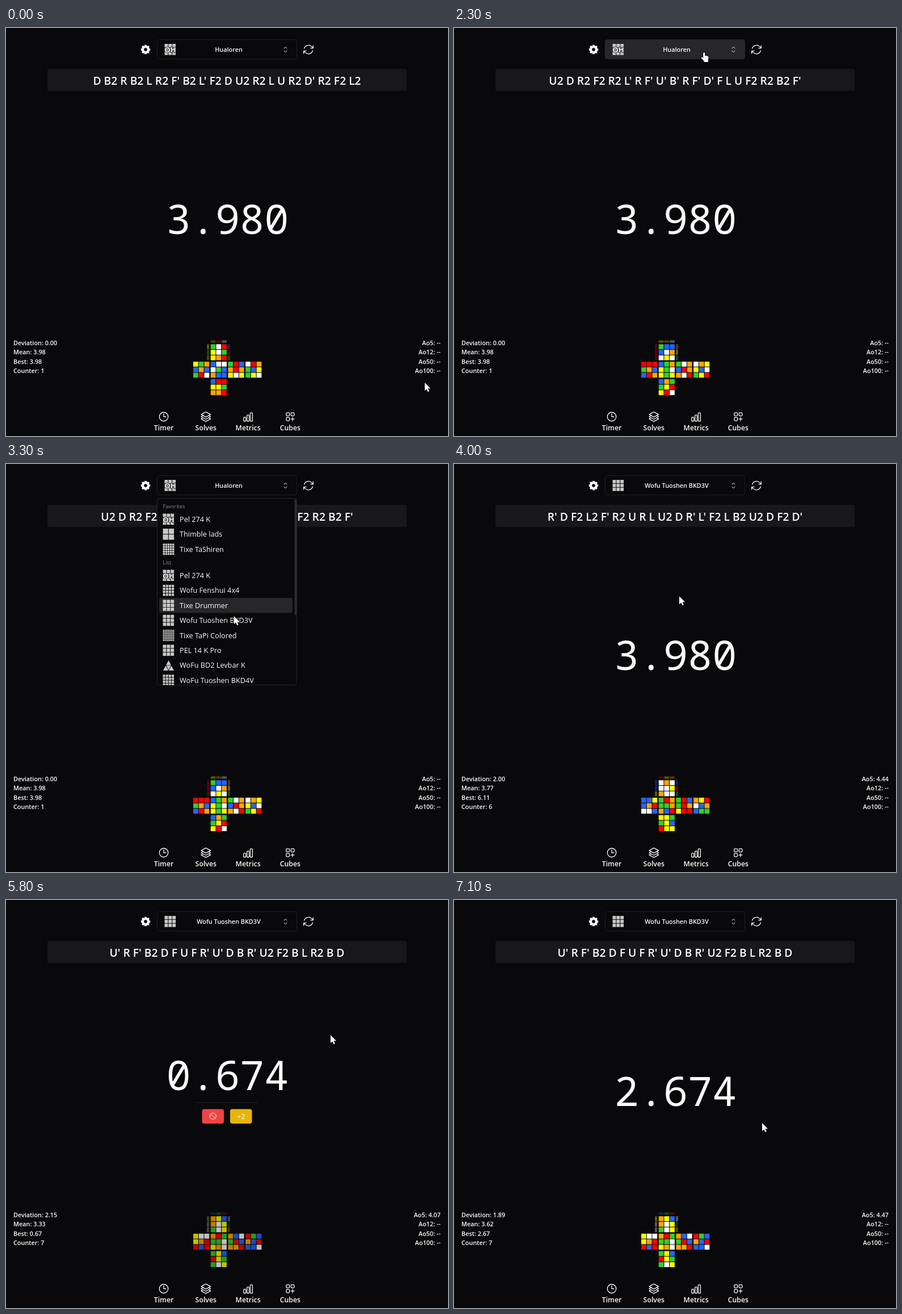
These frames come from a looping animation (779x719 px, 7.2 s). An HTML page with a canvas:

```html
<!DOCTYPE html>
<html lang="en">
<head>
<meta charset="utf-8">
<title>Cube timer</title>
<style>
  html, body { margin: 0; width: 100%; height: 100%; overflow: hidden; background: #09090b; }
  canvas { display: block; }
</style>
</head>
<body>
<canvas id="stage" width="779" height="719"></canvas>
<script>
const ctx = document.getElementById('stage').getContext('2d');
const LOOP = 7200, FADE = 400;
const SANS = '"Open Sans", "Noto Sans", sans-serif', MONO = '"Noto Sans Mono", monospace';
const BG = '#09090b', LINE = '#27272a', WHITE = '#fafafa', GREY = '#c8c8c8';
const OPEN = 2500, PICK = 3500, START = 4826, STOP = 5500, PENALTY = 6500;

// ---- Cube model: stickers lie at distance 2 along the face normal ----
const FACES = { // normal, right, down, net column, net row, colour
  U: [[0, 1, 0], [1, 0, 0], [0, 0, 1], 1, 0, '#fff'],
  L: [[-1, 0, 0], [0, 0, 1], [0, -1, 0], 0, 1, '#ffa500'],
  F: [[0, 0, 1], [1, 0, 0], [0, -1, 0], 1, 1, '#32cd32'],
  R: [[1, 0, 0], [0, 0, -1], [0, -1, 0], 2, 1, '#f00'],
  B: [[0, 0, -1], [-1, 0, 0], [0, -1, 0], 3, 1, '#2266ff'],
  D: [[0, -1, 0], [1, 0, 0], [0, 0, -1], 1, 2, '#ff0']
};
const dot = (a, b) => a[0] * b[0] + a[1] * b[1] + a[2] * b[2];
const cross = (a, b) => [0, 1, 2].map(i => a[(i + 1) % 3] * b[(i + 2) % 3] - a[(i + 2) % 3] * b[(i + 1) % 3]);
const place = ([n, r, d], i) => n.map((v, k) => 2 * v + (i % 3 - 1) * r[k] + (Math.floor(i / 3) - 1) * d[k]);

function turn(p, n) {
  const along = dot(n, p), c = cross(n, p);
  return along < 1 ? p : n.map((v, k) => v * along - c[k]);
}

function scrambleNet(moves) {
  const colours = {};
  for (const face of Object.values(FACES))
    for (let i = 0; i < 9; i++) {
      let p = place(face, i);
      for (const m of moves.split(' ')) {
        const turns = m[1] === '2' ? 2 : m[1] ? 3 : 1;
        for (let k = 0; k < turns; k++) p = turn(p, FACES[m[0]][0]);
      }
      colours[p.join()] = face[5];
    }
  const net = {};
  for (const f in FACES) net[f] = [...Array(9).keys()].map(i => colours[place(FACES[f], i).join()]);
  return net;
}

const scrambles = [
  [-FADE, "D B2 R B2 L R2 F' B2 L' F2 D U2 R2 L U R2 D' R2 F2 L2"],
  [1290, "L B L D2 B2 L' U B2 L' U2 R' U2 L D F2 D2 B' D U' L2"],
  [1790, "U2 D R2 F2 R2 L' R F' U' B' R F' D' F L U F2 R2 B2 F'"],
  [PICK, "R' D F2 L2 F' R2 U R L U2 D R' L' F2 L B2 U2 D F2 D'"],
  [STOP, "U' R F' B2 D F U F R' U' D B R' U2 F2 B L R2 B D"]
].map(([since, moves]) => [since, moves, scrambleNet(moves)]);

const stats = [ // time, deviation, mean, best, counter, Ao5
  [0, '0.00', '3.98', '3.98', 1, '--'],
  [PICK, '2.00', '3.77', '6.11', 6, '4.44'],
  [STOP, '2.15', '3.33', '0.67', 7, '4.07'],
  [PENALTY, '1.89', '3.62', '2.67', 7, '4.47']
];

const favorites = [['OH', 'Pel 274 K'], [2, 'Thimble lads'], [5, 'Tixe TaShiren']];
const list = [
  ['OH', 'Pel 274 K'], [4, 'Wofu Fenshui 4x4'], [3, 'Tixe Drummer'], [3, 'Wofu Tuoshen BKD3V'],
  [7, 'Tixe TaPi Colored'], [3, 'PEL 14 K Pro'], ['tri', 'WoFu BD2 Levbar K'], [4, 'WoFu Tuoshen BKD4V']
];
const rows = [
  ...favorites.map((r, i) => [...r, 97.5 + 26.4 * i]),
  ...list.map((r, i) => [...r, 196.5 + 26.4 * i])
];

const pointer = [ // time, x, y of the tip
  [0, 738, 625], [200, 738, 625], [900, 534, 39], [1850, 534, 39], [2300, 437, 43], [2500, 437, 43],
  [2700, 415, 190], [2900, 395, 213], [3350, 402, 270], [3600, 402, 270], [4000, 397, 233], [4100, 397, 233],
  [4700, 572, 238], [5800, 572, 238], [6350, 414, 382], [6600, 414, 382], [7100, 543, 393], [7200, 543, 393]
];

const TILE = 'm2 0h2.75q2 0 2 2v2.75q0 2-2 2h-2.75q-2 0-2-2v-2.75q0-2 2-2z';
const ICONS = {
  refresh: 'M16.023 9.348h4.992M2.985 19.644v-4.992h4.992m-4.993 0 3.181 3.183a8.25 8.25 0 0 0 13.803-3.7M4.031 9.865a8.25 8.25 0 0 1 13.803-3.7l3.181 3.182v-4.99',
  chevrons: 'M8.25 15 12 18.75 15.75 15m-7.5-6L12 5.25 15.75 9',
  Timer: 'M12 6v6h4.5M21 12a9 9 0 1 1-18 0 9 9 0 0 1 18 0z',
  Solves: 'M2.25 7.5 12 2.25l9.75 5.25L12 12.75zM6.43 9.75 2.25 12 12 17.25 21.75 12l-4.18-2.25M6.43 14.25 2.25 16.5 12 21.75l9.75-5.25-4.18-2.25',
  Metrics: 'M3 14q0-1 1-1h2.5q1 0 1 1v6q0 1-1 1H4q-1 0-1-1zM9.75 9.6q0-1 1-1h2.5q1 0 1 1V20q0 1-1 1h-2.5q-1 0-1-1zM16.5 5.1q0-1 1-1H20q1 0 1 1V20q0 1-1 1h-2.5q-1 0-1-1z',
  Cubes: `M3.75 3.75${TILE}M13.5 3.75${TILE}M3.75 13.5${TILE}M13.5 16.875h6.75M16.875 13.5v6.75`,
  ban: 'M21 12a9 9 0 1 1-18 0 9 9 0 0 1 18 0zM5.6 5.6l12.8 12.8'
};
const ARROW = new Path2D('M0 0V14.2L3.3 11.2 5.5 16.2 7.9 15.1 5.7 10.3H10.2Z');
const HAND = new Path2D('M2.2 8.6V1.6Q2.2 0 3.7 0T5.2 1.6V5.6L9.9 6.6Q11.8 7 11.6 9L10.8 14.5V17H3.6V15.2L-.9 10.4Q-1.4 9.4-.5 8.7T1.3 8.8L2.2 9.7Z');

// ---- Drawing helpers ----
const latest = (states, t) => states.filter(([since]) => since <= t).pop();

function text(str, x, y, size, { weight = 600, align = 'left', color = WHITE, font = SANS } = {}) {
  ctx.font = `${weight} ${size}px ${font}`;
  ctx.textAlign = align;
  ctx.fillStyle = color;
  ctx.fillText(str, x, y);
}

function box(x, y, w, h, r, fill, stroke) {
  ctx.beginPath();
  ctx.roundRect(x, y, w, h, r);
  ctx.fillStyle = fill;
  ctx.fill();
  if (stroke) { ctx.strokeStyle = stroke; ctx.lineWidth = 1; ctx.stroke(); }
}

function icon(name, cx, cy, scale, width = 1.5) {
  ctx.save();
  ctx.translate(cx, cy);
  ctx.scale(scale, scale);
  ctx.translate(-12, -12);
  ctx.lineCap = ctx.lineJoin = 'round';
  ctx.lineWidth = width;
  ctx.strokeStyle = WHITE;
  ctx.stroke(new Path2D(ICONS[name]));
  ctx.restore();
}

function gear(cx, cy) {
  ctx.save();
  ctx.translate(cx, cy);
  ctx.fillStyle = ctx.strokeStyle = WHITE;
  for (let i = 0; i < 8; i++) {
    ctx.fillRect(-2, -8.2, 4, 4);
    ctx.rotate(Math.PI / 4);
  }
  ctx.lineWidth = 3.8;
  ctx.beginPath();
  ctx.arc(0, 0, 4.8, 0, 7);
  ctx.stroke();
  ctx.restore();
}

function puzzleIcon(kind, cx, cy) {
  const x = cx - 10, y = cy - 10;
  ctx.fillStyle = GREY;
  if (kind === 'tri') {
    for (const [dx, dy] of [[0, -9], [-5, 0.5], [5, 0.5]])
      ctx.fill(new Path2D(`M${cx + dx} ${cy + dy}l4.5 8.5h-9z`));
    ctx.fill(new Path2D(`M${cx - 4} ${cy + .3}h8l-4 7.7z`));
    return;
  }
  const n = kind === 'OH' ? 3 : kind, step = 20.6 / n, gap = n > 4 ? .7 : 1;
  for (let i = 0; i < n * n; i++)
    ctx.fillRect(x + i % n * step, y + Math.floor(i / n) * step, step - gap, step - gap);
  if (kind === 'OH') {
    ctx.font = `700 13px ${SANS}`;
    ctx.textAlign = 'center';
    ctx.lineWidth = 2;
    ctx.strokeStyle = '#333';
    ctx.strokeText('OH', cx, cy + 5);
    ctx.fillStyle = '#eee';
    ctx.fillText('OH', cx, cy + 5);
  }
}

function drawNet(net, opacity) {
  const cell = 9.75, left = 329.5, top = 556.8, step = 30.7;
  const sticker = (x, y, w, h, color, alpha) => {
    ctx.globalAlpha = opacity * alpha;
    ctx.fillStyle = '#000';
    ctx.fillRect(x, y, w, h);
    ctx.fillStyle = color;
    ctx.fillRect(x + .5, y + .5, w - 1, h - 1);
  };
  for (const f in FACES) {
    const [, , , col, row] = FACES[f];
    net[f].forEach((c, i) =>
      sticker(left + col * step + i % 3 * cell, top + row * step + Math.floor(i / 3) * cell, cell, cell, c, 1));
  }
  for (let i = 0; i < 3; i++) {
    sticker(left + step + i * cell, 550, cell, 5, net.B[2 - i], .33);
    sticker(353.5, top + i * cell, 5, cell, net.L[i], .33);
    sticker(390.5, top + i * cell, 5, cell, net.R[2 - i], .33);
  }
  ctx.globalAlpha = 1;
}

function pointerAt(t) {
  const i = Math.max(1, pointer.findIndex(p => p[0] >= t));
  const [t0, x0, y0] = pointer[i - 1], [t1, x1, y1] = pointer[i];
  const u = Math.max(0, (t - t0) / (t1 - t0)), e = u * u * (3 - 2 * u);
  return [x0 + (x1 - x0) * e, y0 + (y1 - y0) * e];
}

// ---- Parts of the page ----
function drawHeader(t, [px, py]) {
  const open = t >= OPEN && t < PICK;
  const hover = !open && px > 266 && px < 513 && py > 20 && py < 55;
  gear(246, 38);
  box(266.5, 20.5, 246, 34, 4, hover ? LINE : BG, hover ? LINE : '#1f1f23');
  puzzleIcon(t < PICK ? 'OH' : 3, 289.5, 38);
  text(t < PICK ? 'Hualoren' : list[3][1], 392.5, 42, 10.85, { align: 'center' });
  icon('chevrons', 492.5, 38, .7, 1.4);
  icon('refresh', 533, 38, .92, 1.4);
}

function drawTimer(t) {
  const review = t >= STOP && t < PENALTY;
  const value = t < START ? 3.98 : t < PENALTY ? (Math.min(t, STOP) - START) / 1000 : 2.674;
  text(value.toFixed(3), 390.5, review ? 334.5 : 362.5, 72, { weight: 500, align: 'center', font: MONO });
  if (!review) return;
  ctx.fillStyle = LINE;
  ctx.fillRect(335, 356.5, 109, 1);
  box(345.5, 368.5, 38.5, 25.5, 4, '#ef4444');
  icon('ban', 364.7, 381, .62, 1.6);
  box(395, 368.5, 38.5, 25.5, 4, '#eab308');
  text('+2', 414.3, 386, 12.5, { weight: 500, align: 'center' });
}

function drawStats(t) {
  const [, deviation, mean, best, count, ao5] = latest(stats, t);
  [`Deviation: ${deviation}`, `Mean: ${mean}`, `Best: ${best}`, `Counter: ${count}`]
    .forEach((s, i) => text(s, 13, 558.5 + 16.5 * i, 10.85));
  [`Ao5: ${ao5}`, 'Ao12: --', 'Ao50: --', 'Ao100: --']
    .forEach((s, i) => text(s, 766, 558.5 + 16.5 * i, 10.85, { align: 'right' }));
}

function drawNav() {
  ['Timer', 'Solves', 'Metrics', 'Cubes'].forEach((name, i) => {
    const x = 278 + 74.3 * i;
    icon(name, x, 685, .86);
    text(name, x, 709, 12.3, { align: 'center' });
  });
}

function drawMenu(t) {
  const y = pointerAt(t - 100)[1];
  ctx.save();
  box(266.5, 60.5, 246, 329, 4, BG, LINE);
  ctx.clip();
  const caption = { weight: 400, color: '#8b8b93' };
  text('Favorites', 276.5, 78, 9.2, caption);
  text('List', 276.5, 177, 9.2, caption);
  for (const [kind, name, cy] of rows) {
    if (Math.abs(y - cy) <= 13.2) box(270, cy - 13.2, 235, 26.4, 3, LINE);
    puzzleIcon(kind, 286.5, cy);
    text(name, 306, cy + 4.5, 12.7, { weight: 400 });
  }
  box(508.5, 62, 4, 204, 2, '#2c2c30');
  ctx.restore();
}

function drawPointer(t, [x, y]) {
  const menu = t >= OPEN && t < PICK, review = t >= STOP && t < PENALTY;
  const overTop = !menu && x > 266 && x < 545 && y > 20 && y < 55;
  const overButton = review && x > 346 && x < 434 && y > 368 && y < 394;
  const shape = overTop || overButton ? HAND : ARROW;
  ctx.save();
  ctx.translate(x, y);
  ctx.lineWidth = 1.6;
  ctx.strokeStyle = '#000';
  ctx.stroke(shape);
  ctx.fillStyle = '#fff';
  ctx.fill(shape);
  ctx.restore();
}

function draw(t) {
  const tip = pointerAt(t), [since, moves, net] = latest(scrambles, t);
  ctx.fillStyle = BG;
  ctx.fillRect(0, 0, 779, 719);
  drawHeader(t, tip);
  box(73, 72, 633, 39, 4, '#18181b');
  text(moves, 389.5, 99.7, 19.3, { align: 'center' });
  drawTimer(t);
  drawStats(t);
  drawNet(net, Math.min(1, (t - since) / FADE));
  drawNav();
  if (t >= OPEN && t < PICK) drawMenu(t);
  drawPointer(t, tip);
}

const begin = performance.now();
function frame() {
  draw((performance.now() - begin) % LOOP);
  requestAnimationFrame(frame);
}
frame();
</script>
</body>
</html>
```
